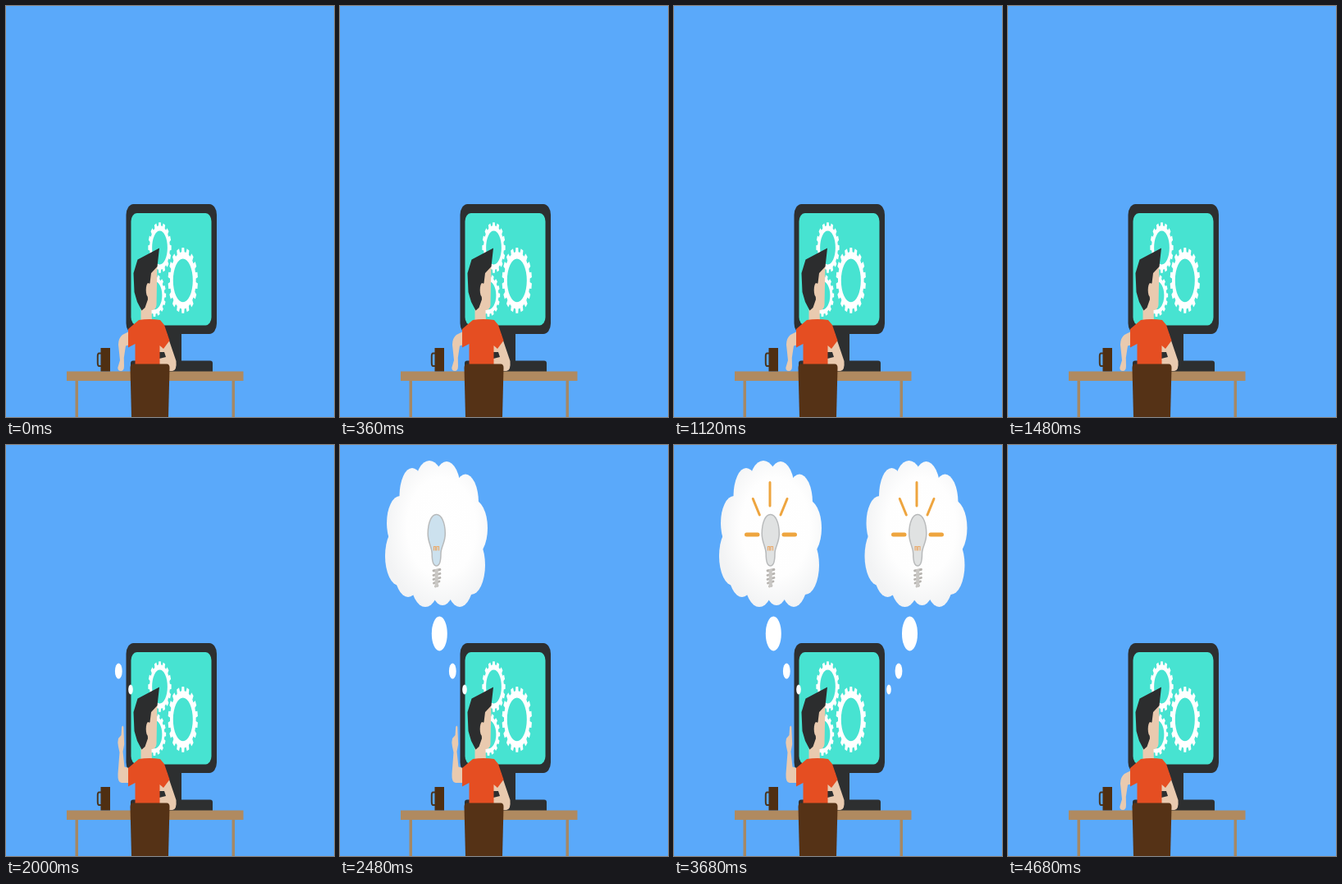
An HTML page for the animation above (4.72 s loop, 400 by 500 pixels).

```html
<!DOCTYPE html>
<html lang="en">
<head>
<meta charset="utf-8">
<title>Idea at the desk</title>
<style>
  html, body { margin: 0; width: 100%; height: 100%; overflow: hidden; background: #5aa9fa; }
  svg { display: block; width: 100vw; height: 100vh; }
  .ray { stroke: #eea53f; stroke-linecap: round; }
  .skin { fill: #e9caaf; }
</style>
</head>
<body>
<svg viewBox="0 0 400 500" preserveAspectRatio="none">
  <defs>
    <radialGradient id="puff" gradientUnits="userSpaceOnUse" cx="0" cy="0" r="1"
      gradientTransform="translate(124 100) scale(70 100)">
      <stop offset="0" stop-color="#fff"/>
      <stop offset=".6" stop-color="#fefefe"/>
      <stop offset="1" stop-color="#f2f3f4"/>
    </radialGradient>
    <clipPath id="screen"><rect x="152.5" y="252" width="98" height="136.5" rx="7" ry="10"/></clipPath>
    <g id="cloud" fill="url(#puff)"></g>
    <g id="rays" fill="none">
      <path class="ray" stroke-width="3" d="M117 45.5V74M96.300 65.500L104.300 85M138 65.500L130 85"/>
      <path class="ray" stroke-width="5" stroke-linecap="butt" d="M88.500 109H102M134 109H147.500"/>
    </g>
    <g id="bulb">
      <path stroke="#b8babb" stroke-width="1.5"
        d="M117.600 84.500C123.500 84.500 128.300 94 128.300 108C128.300 119 123 124 123 132C123 141 121.500 147 117.600 147C113.700 147 112.200 141 112.200 132C112.200 124 107.200 119 107.200 108C107.200 94 111.700 84.500 117.600 84.500Z"/>
      <path d="M114.500 128.500V123.500H116.500V128.500M118 128.500V123.500H120.500V128.500" fill="none" stroke="#e9ac70" stroke-width="1.200"/>
      <path d="M114 153L122 151.500M114 158.500L122 156.500M114 163.500L122 161.500M114.500 168L121 166M116.500 172L119 171"
        fill="none" stroke="#b5b2ae" stroke-width="2.800" stroke-linecap="round"/>
      <path d="M117.700 151V173" stroke="#c9c7c4" stroke-width="4"/>
    </g>
  </defs>

  <rect width="400" height="500" fill="#5aa9fa"/>

  <g fill="#2d2f30">
    <path d="M197 396H214V431.500H249Q252 431.500 252 434.500V445H152V434.500Q152 431.500 155 431.500H197Z"/>
    <rect x="146.500" y="241" width="110.500" height="158" rx="9" ry="13"/>
  </g>
  <rect x="152.500" y="252" width="98" height="136.500" rx="7" ry="10" fill="#47e3d1"/>
  <path id="gears" fill="#fff" fill-rule="evenodd" clip-path="url(#screen)"/>

  <g fill="#a58865">
    <rect x="84.500" y="455" width="3.500" height="45"/>
    <rect x="275.500" y="455" width="3.500" height="45"/>
  </g>
  <rect x="74" y="444.500" width="215.500" height="11.500" fill="#b08a60"/>

  <path d="M116 422.500H113.500Q111.800 422.500 111.800 426V434Q111.800 438 113.500 438H116" fill="none" stroke="#4a3620" stroke-width="2"/>
  <rect x="115.500" y="416" width="11.500" height="28.500" fill="#4f2f12"/>

  <path id="armDown" class="skin" d="M150 396L142 400Q137 404 137 412L139 431L136.300 440Q136.300 444 140 444Q144 444 144 438L143.800 428L146 413.500L151 412Z"/>
  <path id="armUp" class="skin" d="M150 393L144.500 391.500L142.500 373L144.200 364L143.300 343Q142.300 340 141.200 343L140.500 353L137 357Q135.800 361 137 367L138.500 374L136.500 400Q136 411 141 411H150Z"/>
  <path d="M187 419H196V432H187Z" fill="#2d2f30"/>
  <path class="skin" d="M187 412L199 407L207.500 432Q208.500 443.500 203 444H187V429L195 427L193 421H187Z"/>
  <path class="skin" d="M168 330L184.500 314L183.500 364Q182.500 370 177.500 370L178 384H164.500V366Z"/>
  <path d="M187 294.500L160.500 308.500L155.500 325L156.500 348L160 360L165.500 370.500L169.500 367L173 357L172 342L175.500 337L177 325L184.500 317Z" fill="#2c2d2e"/>
  <ellipse class="skin" cx="173.500" cy="345.500" rx="2.800" ry="8.500"/>
  <path d="M162 382Q175 380 188 382L193 388L199.500 407L192 417L187.500 413V437H157.500V411L149 415.500V393Z" fill="#e54e22"/>
  <path d="M151.500 440Q151.500 435.500 155 435.500H196Q199.500 435.500 199.500 440L198 500H153Z" fill="#553216"/>

  <g id="thoughts" fill="#fff">
    <ellipse id="dotA1" cx="152" cy="297.500" rx="2.800" ry="6"/>
    <ellipse id="dotA2" cx="137.300" cy="275" rx="4.400" ry="9.500"/>
    <ellipse id="dotA3" cx="121.300" cy="229.500" rx="9.500" ry="21"/>
    <use id="cloudA" href="#cloud"/>
    <use id="bulbA" href="#bulb"/>
    <use id="raysA" href="#rays"/>
    <ellipse id="dotB1" cx="262" cy="297.500" rx="2.800" ry="6"/>
    <ellipse id="dotB2" cx="274" cy="275" rx="4.400" ry="9.500"/>
    <ellipse id="dotB3" cx="287.500" cy="229.500" rx="9.500" ry="21"/>
    <use id="cloudB" href="#cloud" x="177.500"/>
    <use id="bulbB" href="#bulb" x="179.500"/>
    <use id="raysB" href="#rays" x="179"/>
  </g>
</svg>
<script>
const LOOP = 4720, RESET = 4680;
const $ = id => document.getElementById(id);

// Cloud lobes: cx, cy, rx, ry
const lobes = [
  [117, 108, 45, 68], [88, 62, 15.5, 34], [109, 53, 18, 34], [130, 55, 17, 35],
  [153, 70, 16, 34.5], [162, 101, 18, 35], [160, 146, 17, 36], [146, 162, 17, 35],
  [125, 162, 16, 33], [104, 163, 18, 34], [83, 150, 17, 35], [72, 135, 17, 36],
  [73, 95, 16, 33]
];
$('cloud').innerHTML = lobes.map(([x, y, rx, ry]) =>
  `<ellipse cx="${x}" cy="${y}" rx="${rx}" ry="${ry}"/>`).join('');

function gear(cx, cy, rx, ry, teeth, hole) {
  const points = [];
  for (let i = 0; i < teeth; i++) {
    for (const [step, r] of [[-.32, .87], [-.23, 1], [.23, 1], [.32, .87]]) {
      const a = (i + step) / teeth * 2 * Math.PI - Math.PI / 2;
      points.push(`${(cx + rx * r * Math.cos(a)).toFixed(2)} ${(cy + ry * r * Math.sin(a)).toFixed(2)}`);
    }
  }
  const hx = rx * hole, hy = ry * hole;
  return `M${points.join('L')}ZM${cx - hx} ${cy}a${hx} ${hy} 0 1 0 ${2 * hx} 0a${hx} ${hy} 0 1 0 ${-2 * hx} 0Z`;
}
$('gears').setAttribute('d',
  gear(187.5, 294, 14.2, 31, 16, .66) +
  gear(215.8, 333.8, 18.2, 40, 18, .66) +
  gear(181, 352, 14.2, 26, 16, .66));

// Time at which each part appears
const cues = {
  armUp: 1760,
  dotA1: 1840, dotA2: 1960, dotA3: 2080, cloudA: 2200, bulbA: 2360, raysA: 2760,
  dotB1: 3040, dotB2: 3040, dotB3: 3200, cloudB: 3360, bulbB: 3520, raysB: 3680
};

const show = (id, on) => $(id).setAttribute('visibility', on ? 'visible' : 'hidden');

function draw(now) {
  const t = now % LOOP;
  const active = id => t >= cues[id] && t < RESET;
  for (const id in cues) show(id, active(id));
  show('armDown', !active('armUp'));
  for (const side of 'AB')
    $('bulb' + side).setAttribute('fill', active('rays' + side) ? '#e0e2e2' : '#cce1ee');
}

const start = performance.now();
function tick() {
  draw(performance.now() - start);
  requestAnimationFrame(tick);
}
tick();
</script>
</body>
</html>
```
